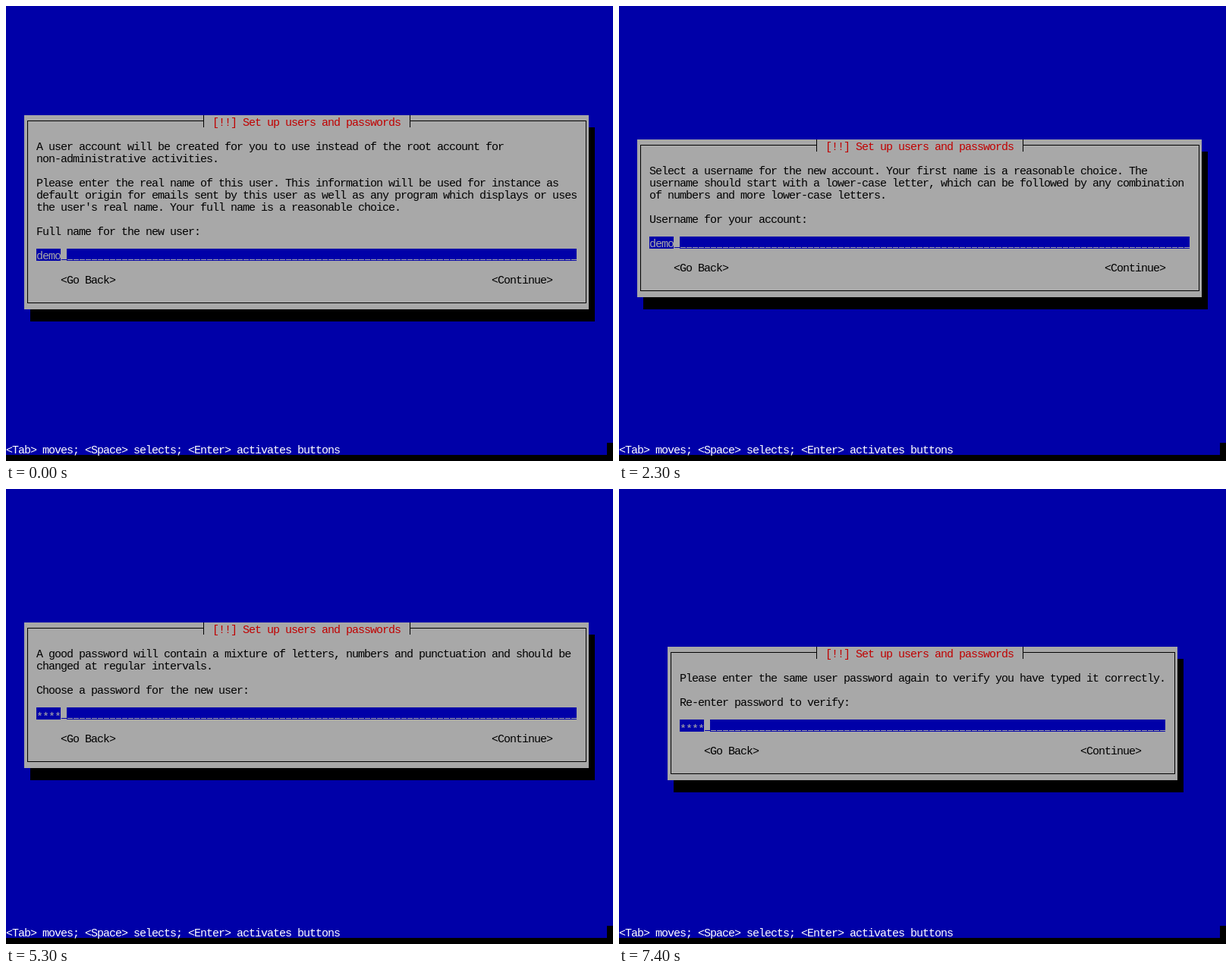
An HTML page with a canvas for the animation above (8 s loop, 800 by 600 pixels).

```html
<!DOCTYPE html>
<html lang="en">
<head>
<meta charset="utf-8">
<title>Set up users and passwords</title>
<style>
html, body { margin: 0; height: 100%; overflow: hidden; background: #0000a8; }
canvas { display: block; }
</style>
</head>
<body>
<canvas id="screen" width="800" height="600"></canvas>
<script>
const ctx = document.getElementById('screen').getContext('2d');
const BLUE = '#0000a8', GRAY = '#a8a8a8', RED = '#c00000';
const CELL = 8, ROW = 16, LOOP = 8000;

const dialogs = [
  { start: 0, x: 24, y: 144, w: 744, entry: 'demo', lines: [
    'A user account will be created for you to use instead of the root account for',
    'non-administrative activities.',
    '',
    'Please enter the real name of this user. This information will be used for instance as',
    'default origin for emails sent by this user as well as any program which displays or uses',
    "the user's real name. Your full name is a reasonable choice.",
    '',
    'Full name for the new user:'] },
  { start: 500, x: 24, y: 176, w: 744, entry: 'demo', lines: [
    'Select a username for the new account. Your first name is a reasonable choice. The',
    'username should start with a lower-case letter, which can be followed by any combination',
    'of numbers and more lower-case letters.',
    '',
    'Username for your account:'] },
  { start: 3500, x: 24, y: 176, w: 744, entry: '****', lines: [
    'A good password will contain a mixture of letters, numbers and punctuation and should be',
    'changed at regular intervals.',
    '',
    'Choose a password for the new user:'] },
  { start: 6500, x: 64, y: 208, w: 672, entry: '****', lines: [
    'Please enter the same user password again to verify you have typed it correctly.',
    '',
    'Re-enter password to verify:'] }
];

function rect(x, y, w, h, color) {
  ctx.fillStyle = color;
  ctx.fillRect(x, y, w, h);
}

// y is the top of the character row
function text(str, x, y, color = '#000') {
  ctx.fillStyle = color;
  ctx.fillText(str, x, y + 14);
}

function underscore(x, y, color) {
  rect(x + 1, y + 14, CELL - 1, 1, color);
}

function drawFrame(x, y, w, h) {
  const left = x + 4, right = x + w - 4, top = y + 7, bottom = y + h - 9;
  rect(x + 8, y + 16, w, h, '#000');
  rect(x, y, w, h, GRAY);
  ctx.strokeStyle = '#000';
  ctx.strokeRect(left + 0.5, top + 0.5, right - left, bottom - top);
  rect(260, y, 273, ROW, GRAY);
  rect(260, y, 1, ROW, '#000');
  rect(532, y, 1, ROW, '#000');
  text('[!!] Set up users and passwords', 272, y, RED);
}

function drawEntry(str, x, y, w) {
  const cursor = x + str.length * CELL;
  rect(x, y, w, ROW, BLUE);
  text(str, x, str[0] === '*' ? y + 3 : y, GRAY);
  rect(cursor, y, CELL, ROW, GRAY);
  underscore(cursor, y, BLUE);
  for (let cx = cursor + CELL; cx < x + w; cx += CELL) underscore(cx, y, GRAY);
}

function drawDialog({ x, y, w, lines, entry }) {
  const entryY = y + ROW * (lines.length + 3);
  drawFrame(x, y, w, entryY + 5 * ROW - y);
  lines.forEach((line, i) => text(line, x + 16, y + ROW * (i + 2)));
  drawEntry(entry, x + 16, entryY, w - 32);
  text('<Go Back>', x + 48, entryY + 2 * ROW);
  text('<Continue>', x + w - 128, entryY + 2 * ROW);
}

function draw(now) {
  const t = now % LOOP;
  ctx.font = '15px "Liberation Mono", monospace';
  ctx.letterSpacing = '-1px';
  rect(0, 0, 800, 600, BLUE);
  rect(0, 592, 800, 8, '#000');
  rect(792, 576, 8, 24, '#000');
  text('<Tab> moves; <Space> selects; <Enter> activates buttons', 0, 576, '#fff');
  drawDialog(dialogs.findLast(d => d.start <= t));
  requestAnimationFrame(draw);
}

draw(performance.now());
</script>
</body>
</html>
```
